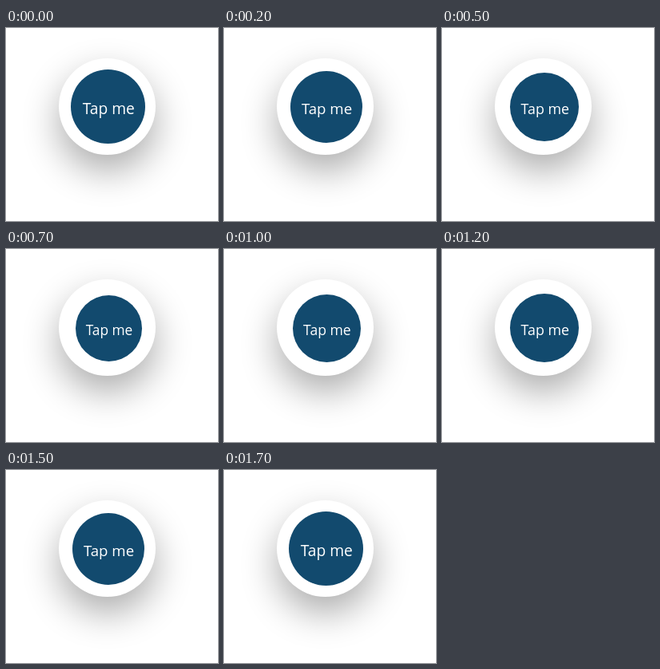
Write an HTML page that moves like this. It is 265 px wide and 242 px high and loops after 1.8 s.

```html
<!DOCTYPE html>
<html lang="en">
<head>
<meta charset="utf-8">
<title>Tap me</title>
<style>
  html, body { margin: 0; width: 100%; height: 100%; overflow: hidden; background: #fff; }
  .stage { position: relative; width: 265px; height: 242px; overflow: hidden; }
  .ring, #button { position: absolute; border-radius: 50%; }
  .ring {
    left: 66px; top: 38px; width: 121px; height: 121px;
    background: #fff; box-shadow: 0 20px 46px rgba(0, 0, 0, .33);
  }
  #button { background: #124a6e; }
  svg { position: absolute; left: 0; top: 0; }
  text { font-family: "Open Sans", "Noto Sans", sans-serif; fill: #fff; text-anchor: middle; }
</style>
</head>
<body>
<div class="stage">
  <div class="ring"></div>
  <div id="button"></div>
  <svg width="265" height="242"><text id="label" y="108.3">Tap me</text></svg>
</div>
<script>
  const LOOP = 1800, STEP = 100, DEPTH = 7;
  const button = document.getElementById('button');
  const label = document.getElementById('label');

  const mix = (from, to, p) => from + (to - from) * p;

  // Press in one level per step, hold, then release.
  const pressAt = ms => {
    const tick = Math.floor(ms % LOOP / STEP);
    return (tick < 10 ? Math.min(DEPTH, tick) : Math.min(DEPTH - 1, 17 - tick)) / DEPTH;
  };

  function draw(p) {
    const edge = (from, to) => Math.round(mix(from, to, p));
    const left = edge(81, 87), right = edge(174, 170);
    const top = edge(52.4, 58.1), bottom = edge(145, 141);
    Object.assign(button.style, {
      left: `${left}px`, top: `${top}px`,
      width: `${right - left}px`, height: `${bottom - top}px`
    });
    label.setAttribute('x', mix(128.3, 129, p));
    label.setAttribute('font-size', mix(19.2, 17.3, p));
  }

  const start = performance.now();
  function tick() {
    draw(pressAt(performance.now() - start));
    requestAnimationFrame(tick);
  }
  tick();
</script>
</body>
</html>
```
